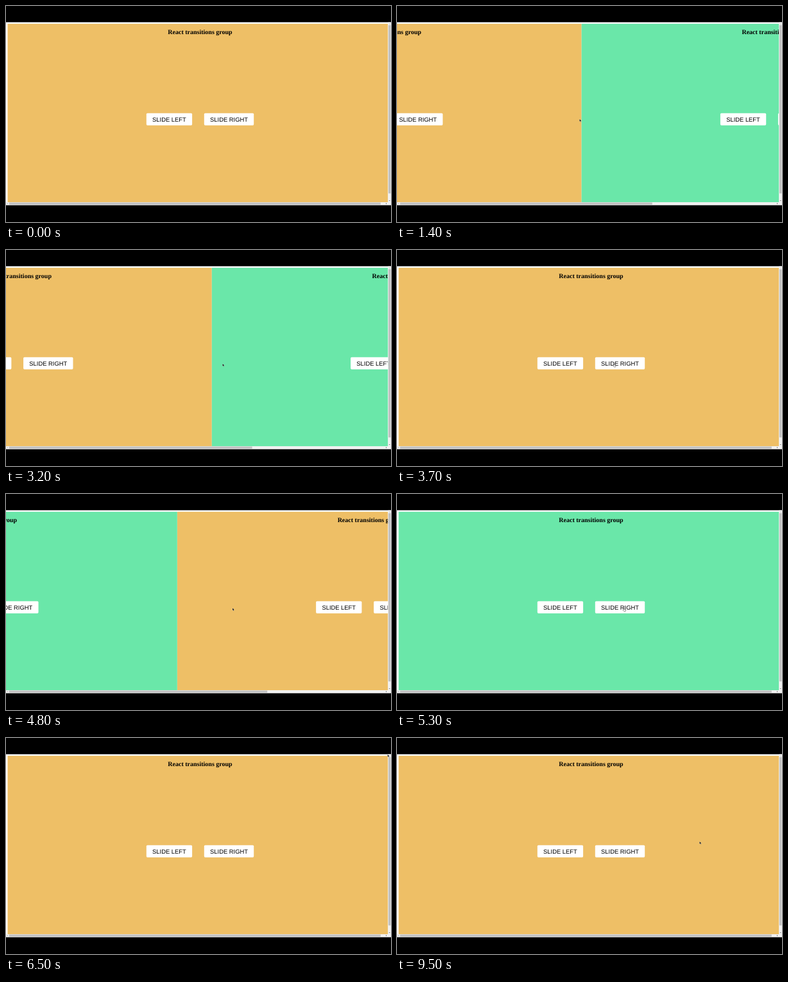
An HTML page that plays this animation: 600x338 px, repeating every 9.6 s.

```html
<!DOCTYPE html>
<html lang="en">
<head>
<meta charset="utf-8">
<title>Sliding pages</title>
<style>
  html, body { margin: 0; width: 100%; height: 100%; overflow: hidden; background: #000; }
  svg { display: block; width: 100%; height: 100%; }
  text { text-anchor: middle; text-rendering: geometricPrecision; }
  .title { font: bold 10px "Liberation Serif", "Times New Roman", serif; }
  .label { font: 9.4px "Liberation Sans", Arial, sans-serif; }
</style>
</head>
<body>
<svg viewBox="0 0 600 338">
  <defs>
    <clipPath id="view"><rect y="25.4" width="595.4" height="281.5"/></clipPath>
    <g id="content">
      <text class="title" x="302.5" y="43.5">React transitions group</text>
      <rect x="218.8" y="167.8" width="71.3" height="18.9" rx="1.6" fill="#fff"/>
      <text class="label" x="254.4" y="180.6">SLIDE LEFT</text>
      <rect x="308.8" y="167.8" width="77.4" height="18.9" rx="1.6" fill="#fff"/>
      <text class="label" x="347.5" y="180.6">SLIDE RIGHT</text>
    </g>
  </defs>
  <rect y="25.4" width="600" height="286.1" fill="#fff"/>
  <g clip-path="url(#view)">
    <g id="orange"><rect x="2.5" y="27.8" width="600" height="286" fill="#eebf66"/><use href="#content"/></g>
    <g id="green"><rect x="2.5" y="27.8" width="600" height="286" fill="#6ae7a9"/><use href="#content"/></g>
  </g>
  <g id="bars">
    <path d="M595.4 25.4H600V311.5H0V306.9H595.4Z" fill="#f1f1f1"/>
    <rect x="596" y="30" width="3.4" height="263.3" fill="#c1c1c1"/>
    <rect id="thumb" x="4.7" y="307.5" height="3.4" fill="#c1c1c1"/>
    <path d="M596.6 28.6h2.2l-1.1-1.2zM2.9 308.1v2.2l-1.2-1.1z" fill="#a3a3a3"/>
    <path d="M596.6 303.9h2.2l-1.1 1.2zM592.2 308.1v2.2l1.2-1.1z" fill="#505050"/>
  </g>
  <g id="cursor">
    <path id="arrow" d="M0 0V3.8L.9 3L1.6 4.4L2.3 4L1.7 2.8H3Z" fill="#000" stroke="#fff" stroke-width=".25"/>
    <path id="hand" d="M0 0q.6-.6 1 .1V2l2 .4q.7.2.6 1L3.2 5H.7L-.9 3q-.2-.7.4-.6l.5.4Z" fill="#fff" stroke="#333" stroke-width=".5"/>
  </g>
</svg>
<script>
const LOOP = 9600, STEP = 100, SLIDE = 680, PAGE = 600;
const $ = id => document.getElementById(id);
const pages = [$('orange'), $('green')];

// start time and direction (-1 left, 1 right); pages alternate
const slides = [[1192, -1], [2990, 1], [4620, 1], [5820, 1]];

// pointer paths: time, x, y
const paths = [
  [[200, 522, 50], [900, 284.5, 177], [1700, 284.5, 177], [2100, 337.5, 178],
   [4000, 337.5, 178], [4500, 353, 178.5], [6100, 353, 178.5], [6500, 594.7, 25.8], [8500, 594.7, 25.8]],
  [[9000, 543, 50], [9500, 471.5, 162], [9600, 471.5, 162]]
];

// cubic-bezier(.25, .1, .25, 1)
function ease(x) {
  if (x <= 0) return 0;
  if (x >= 1) return 1;
  const curve = (s, a, b) => 3 * (1 - s) * s * ((1 - s) * a + s * b) + s * s * s;
  let lo = 0, hi = 1;
  for (let i = 0; i < 24; i++) {
    const mid = (lo + hi) / 2;
    if (curve(mid, .25, .25) < x) lo = mid; else hi = mid;
  }
  return curve(lo, .1, 1);
}

function pageOffsets(t) {
  let shown = 0;
  for (const [start, dir] of slides) {
    if (t < start) break;
    if (t < start + SLIDE) {
      const out = dir * PAGE * ease((t - start) / SLIDE);
      const inward = out - dir * PAGE;
      return shown ? [inward, out] : [out, inward];
    }
    shown = 1 - shown;
  }
  return shown ? [null, 0] : [0, null];
}

function pointerAt(t) {
  const path = paths.find(p => t >= p[0][0] && t < p[p.length - 1][0]);
  if (!path) return null;
  const i = path.findIndex(p => t < p[0]);
  const [t0, x0, y0] = path[i - 1], [t1, x1, y1] = path[i];
  const k = (t - t0) / (t1 - t0), e = k * k * (3 - 2 * k);
  return [x0 + (x1 - x0) * e, y0 + (y1 - y0) * e];
}

const show = (el, on) => el.setAttribute('visibility', on ? 'visible' : 'hidden');
const move = (el, x, y) => el.setAttribute('transform', `translate(${x} ${y})`);

function draw(t) {
  const offsets = pageOffsets(t);
  offsets.forEach((x, i) => {
    show(pages[i], x !== null);
    if (x !== null) move(pages[i], x, 0);
  });
  const live = offsets.filter(x => x !== null);
  const width = Math.max(...live) + PAGE + 2.5;
  $('thumb').setAttribute('width', 586 * 595.4 / width);

  const p = pointerAt(t);
  let over = false;
  if (p) {
    const [x, y] = p;
    over = y > 168 && y < 187 && live.some(o =>
      (x - o > 219 && x - o < 290) || (x - o > 309 && x - o < 386));
    move($('cursor'), x, y);
  }
  show($('arrow'), p && !over);
  show($('hand'), p && over);
}

const begin = performance.now();
function tick() {
  const t = (performance.now() - begin) % LOOP;
  draw(Math.floor(t / STEP) * STEP);
  requestAnimationFrame(tick);
}
tick();
</script>
</body>
</html>
```
